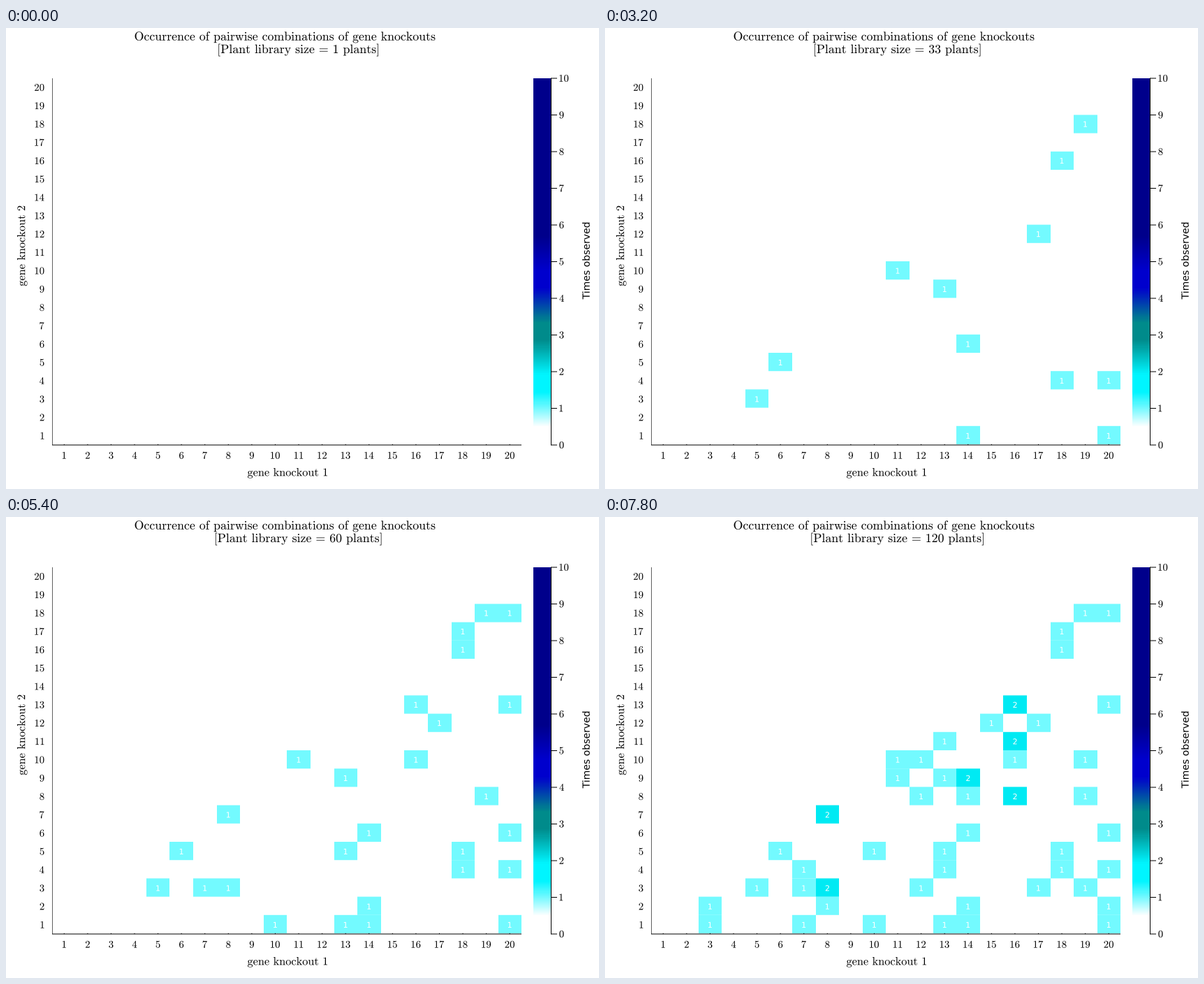
A matplotlib script for the animation above (8 s loop, 849 by 660 pixels).

```python
import math

import numpy as np
import matplotlib.pyplot as plt
from matplotlib.animation import FuncAnimation
from matplotlib.patches import PathPatch, Rectangle
from matplotlib.path import Path
from matplotlib.textpath import TextPath

W, H, DPI = 849, 660, 100
PX = 72 / DPI
GENES = 20
LEFT, RIGHT, TOP, BOTTOM = 66.5, 738, 72, 597
COL, ROW = (RIGHT - LEFT) / GENES, (BOTTOM - TOP) / GENES
UNIT = (BOTTOM - TOP) / 10
TITLE, LABEL, TICK, COUNT = 17.85, 16.3, 14.8, 11

plt.rcParams["mathtext.fontset"] = "cm"
plt.rcParams["font.family"] = "DejaVu Sans"

# Library size shown at each step: by twos up to 49, then by fives.
SIZES = [*range(1, 50, 2), *range(50, 121, 5)]

# Knockout pairs (gene 1, gene 2) in the order they are observed.
PAIRS = [
    (13, 9), (18, 16), (17, 12), (14, 6), (5, 3), (20, 1), (14, 1), (6, 5),
    (11, 10), (18, 4), (20, 4), (19, 18), (18, 5), (19, 8), (13, 5), (8, 7),
    (13, 1), (8, 3), (20, 18), (7, 3), (10, 1), (16, 13), (20, 13), (14, 2),
    (18, 17), (16, 10), (20, 6), (8, 7), (16, 13), (19, 3), (14, 9), (19, 10),
    (16, 8), (16, 11), (10, 5), (13, 11), (7, 1), (16, 11), (3, 2), (14, 8),
    (14, 9), (17, 3), (8, 2), (16, 8), (7, 4), (12, 8), (13, 4), (12, 10),
    (15, 12), (3, 1), (8, 3), (20, 2), (11, 9), (12, 3),
][:54]


def pairs_seen(size):
    """How many pairs a library of this size has shown so far."""
    return math.ceil(np.interp(size, [1, 19, 33, 47, 75, 100, 120],
                               [0, 6, 12, 19, 35, 47, len(PAIRS)]))


# Colour scale: flat bands joined by short ramps.
BANDS = np.repeat([(255, 255, 255), (0, 245, 255), (0, 139, 139),
                   (0, 0, 205), (0, 0, 139)], 2, axis=0) / 255
STOPS = [(3 * (k // 2) + k % 2) * 10 / 21 for k in range(len(BANDS))]


def shade(value):
    return np.stack([np.interp(value, STOPS, BANDS[:, k]) for k in range(3)], -1)


def roman(s):
    s = s.replace(" = ", r"\hspace{0.18}=\hspace{0.18}")
    return r"$\mathrm{" + s.replace(" ", r"\hspace{0.38}") + "}$"


fig = plt.figure(figsize=(W / DPI, H / DPI), dpi=DPI, facecolor="white")
ax = fig.add_axes([0, 0, 1, 1])


def text_path(x, y, s, size, align=0.5, turned=False):
    """Outline of s with its baseline at y, or at x when turned upright."""
    path = TextPath((0, 0), s, size=size)
    box = path.get_extents()
    v = path.vertices - [box.x0 + align * box.width, 0]
    if turned:
        v = np.column_stack([-v[:, 1], v[:, 0]])
    return Path(v + [x, H - y], path.codes)


def text(*args, color="black", **kw):
    return ax.add_patch(PathPatch(text_path(*args, **kw), fc=color, lw=0, zorder=4))


def line(x0, y0, x1, y1, color="black"):
    ax.plot([x0, x1], [H - y0, H - y1], color=color, lw=PX, snap=False,
            solid_capstyle="butt", zorder=3)


def center(col, row):
    return LEFT + COL * (col - 0.5), BOTTOM - ROW * (row - 0.5)


def draw_axes():
    line(LEFT, TOP, LEFT, BOTTOM, "#606060")
    line(LEFT - 0.5, BOTTOM, RIGHT, BOTTOM)
    for g in range(1, GENES + 1):
        x, y = center(g, g)
        line(x, BOTTOM, x, BOTTOM - 1.2)
        text(x, 616.7, roman(str(g)), TICK)
        text(54.5, y + 4.8, roman(str(g)), TICK, align=1)
    text(403, 641.4, roman("gene knockout 1"), LABEL)
    text(27.3, 312, roman("gene knockout 2"), LABEL, turned=True)
    text(399.5, 17.8, roman("Occurrence of pairwise combinations of gene knockouts"),
         TITLE)


def draw_scale():
    ax.imshow(shade(np.linspace(10, 0, 256))[:, None],
              extent=(755, 780, H - BOTTOM, H - TOP),
              aspect="auto", interpolation="nearest", zorder=1)
    line(780.5, TOP - 0.5, 780.5, BOTTOM + 0.5)
    for v in range(11):
        y = BOTTOM - UNIT * v
        line(780.5, y, 789, y)
        text(792.3, y + 4.8, roman(str(v)), TICK, align=0)
    text(835.6, 333.5, "Times observed", 14, turned=True)


def make_cell(col, row):
    x0, x1 = (math.ceil(66 + 33.6 * c - 1e-6) for c in (col - 1, col))
    y1 = 596 - 26.2 * (row - 1)
    box = ax.add_patch(Rectangle((x0, H - y1), x1 - x0, 26.2,
                                 lw=0, snap=False, zorder=2))
    x, y = center(col, row)
    digits = [text(x, y + 4, str(n), COUNT, color="white") for n in (1, 2)]
    return box, digits


draw_axes()
draw_scale()
subtitle = text(418.7, 36, roman("[Plant library size = 1 plants]"), TITLE)
cells = {pair: make_cell(*pair) for pair in sorted(set(PAIRS))}
ax.set_xlim(0, W)
ax.set_ylim(0, H)
ax.axis("off")


def update(step):
    size = SIZES[step]
    seen = PAIRS[:pairs_seen(size)]
    for pair, (box, digits) in cells.items():
        n = seen.count(pair)
        box.set_visible(n > 0)
        box.set_facecolor(shade(n))
        for k, digit in enumerate(digits, 1):
            digit.set_visible(k == n)
    label = roman(f"[Plant library size = {size} plants]")
    subtitle.set_path(text_path(418.7, 36, label, TITLE))
    return []


anim = FuncAnimation(fig, update, frames=len(SIZES), interval=200,
                     init_func=lambda: update(0), repeat=True, repeat_delay=0)
plt.show()
```
